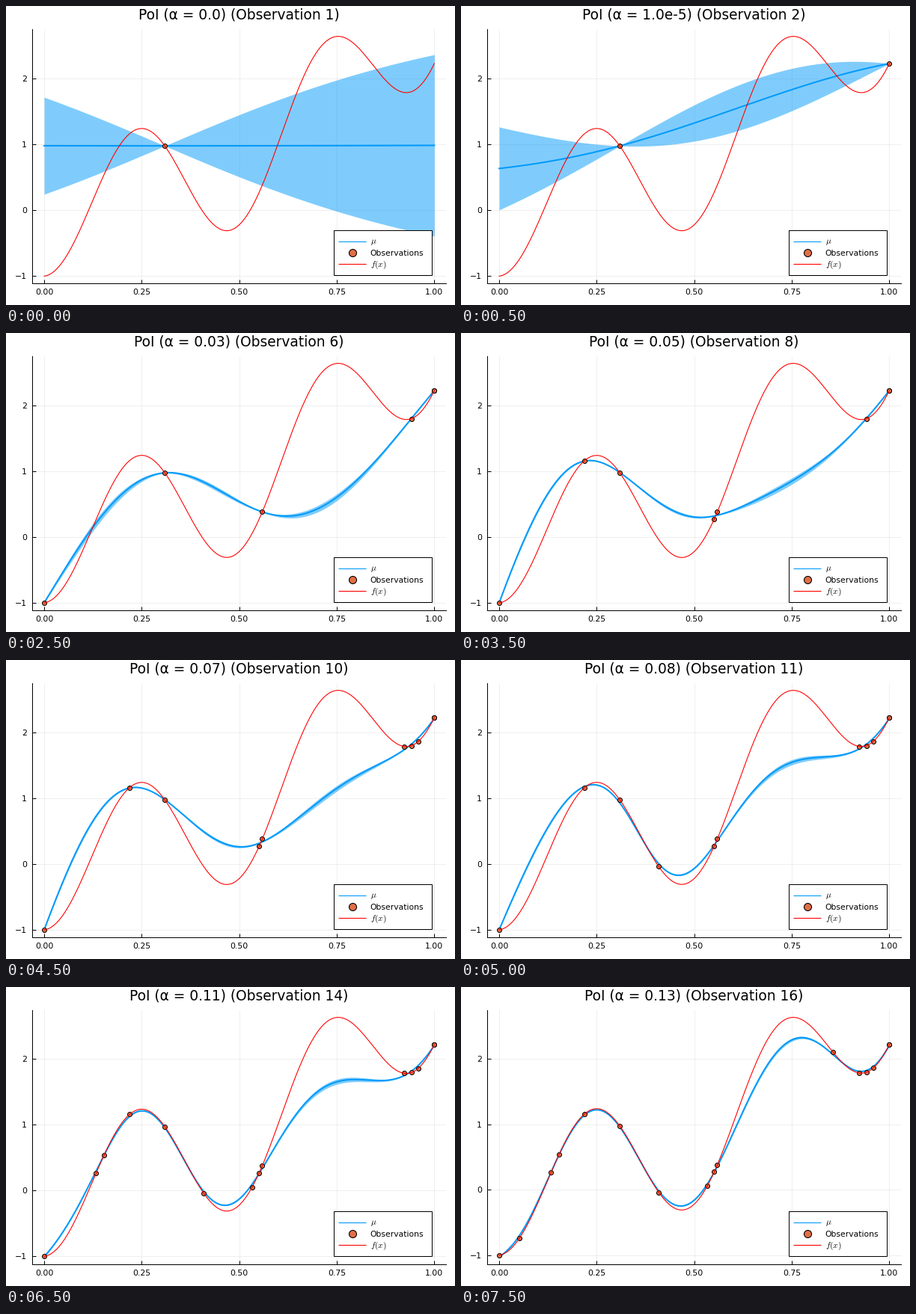
These frames come from a looping animation (600x400 px, 8000 ms). A matplotlib script:

```python
import numpy as np
import matplotlib.pyplot as plt
from matplotlib.animation import FuncAnimation
from matplotlib.patches import Rectangle

DPI = 100
W, H = 600, 400
PX = 72 / DPI  # points per pixel
LEFT, RIGHT, TOP, BOTTOM = 35.4, 588, 31, 371  # plot area, pixels from the top left
MARGIN = .03
BLUE, ORANGE, RED = "#009AFA", "#E26F46", "#FF0000"

plt.rcParams["font.family"] = "DejaVu Sans"
plt.rcParams["mathtext.fontset"] = "cm"


def objective(x):
    return .70 * x + .50 * x**2 + 2.55 * x**3 - .62 * x**4 - np.cos(13 * x)


# Gaussian process with a Matern 5/2 kernel
PRIOR_MEAN, NOISE, Z = 1.0, 1e-5, 1.96


def kernel(a, b):
    t = np.sqrt(5) * np.abs(a[:, None] - b[None, :])
    return (1 + t + t**2 / 3) * np.exp(-t)


def posterior(xs, ys, grid):
    cov = kernel(xs, xs) + NOISE * np.eye(len(xs))
    cross = kernel(xs, grid)
    gain = np.linalg.solve(cov, cross)
    mean = PRIOR_MEAN + gain.T @ (ys - PRIOR_MEAN)
    var = 1 - np.sum(cross * gain, axis=0)
    return mean, Z * np.sqrt(np.maximum(var, 0))


# Places sampled, in order
SAMPLES = np.array([.309, 1, 1, .941, 0, .559, .551, .219,
                    .923, .959, .409, .133, .153, .533, .052, .856])
VALUES = objective(SAMPLES)
GRID = np.linspace(0, 1, 601)
TRUTH = objective(GRID)
EARLY_ALPHAS = ("0.0", "1.0e-5", "0.001")


def alpha_label(n):
    return EARLY_ALPHAS[n - 1] if n <= 3 else str((n - 3) / 100)


fig = plt.figure(figsize=(W / DPI, H / DPI), dpi=DPI, facecolor="white")
ax = fig.add_axes([LEFT / W, 1 - BOTTOM / H, (RIGHT - LEFT) / W, (BOTTOM - TOP) / H])
ax.set_xlim(-MARGIN, 1 + MARGIN)
ticks = np.linspace(0, 1, 5)
ax.set_xticks(ticks, [f"{t:.2f}" for t in ticks])
ax.set_yticks(range(-1, 3), [str(v).replace("-", "\u2212") for v in range(-1, 3)])
ax.tick_params(direction="in", length=5 * PX, width=PX, labelsize=10.9 * PX)
ax.tick_params(axis="x", pad=7.5 * PX)
ax.tick_params(axis="y", pad=7.5 * PX)
ax.grid(color="black", alpha=.1, linewidth=.6 * PX)
ax.set_axisbelow(True)
ax.spines[["top", "right"]].set_visible(False)
ax.spines[["left", "bottom"]].set_linewidth(PX)

band = ax.fill_between(GRID, TRUTH, TRUTH, color=BLUE, alpha=.5, linewidth=0, zorder=2)
mean_line, = ax.plot([], [], color=BLUE, lw=2 * PX, zorder=3)
dots, = ax.plot([], [], "o", color=ORANGE, ms=6 * PX, mec="black", mew=PX,
                zorder=4, clip_on=False)
ax.plot(GRID, TRUTH, color=RED, lw=1.1 * PX, zorder=5)
title = fig.text(311.6 / W, 1 - 17.2 / H, "", fontsize=18.65 * PX, ha="center", va="baseline")

# Legend, laid out in pixels
leg = fig.add_axes([0, 0, 1, 1], zorder=5)
leg.set_xlim(0, W)
leg.set_ylim(H, 0)
leg.axis("off")
leg.add_patch(Rectangle((438.2, 299.7), 131.2, 60.2, fc="white", ec="black", lw=PX))
for y, color in ((314.7, BLUE), (344.7, RED)):
    leg.plot([444, 481], [y, y], color=color, lw=1.1 * PX, solid_capstyle="butt")
leg.plot([462.5], [329.8], "o", color=ORANGE, ms=10 * PX, mec="black", mew=1.1 * PX)
leg.text(487, 317.7, r"$\mu$", fontsize=11.3 * PX)
leg.text(486.5, 334.2, "Observations", fontsize=10.8 * PX)
leg.text(487, 348.4, "$f(x)$", fontsize=11.3 * PX)


def update(i):
    n = i + 1
    xs, ys = SAMPLES[:n], VALUES[:n]
    mean, half = posterior(xs, ys, GRID)
    low, high = mean - half, mean + half
    band.set_verts([np.column_stack([np.r_[GRID, GRID[::-1]], np.r_[low, high[::-1]]])])
    mean_line.set_data(GRID, mean)
    dots.set_data(xs, ys)
    bottom, top = min(TRUTH.min(), low.min()), max(TRUTH.max(), high.max())
    pad = MARGIN * (top - bottom)
    ax.set_ylim(bottom - pad, top + pad)
    title.set_text(f"PoI (\u03b1 = {alpha_label(n)}) (Observation {n})")
    return band, mean_line, dots, title


anim = FuncAnimation(fig, update, frames=len(SAMPLES), interval=500,
                     repeat=True, repeat_delay=0, blit=False)
plt.show()
```
